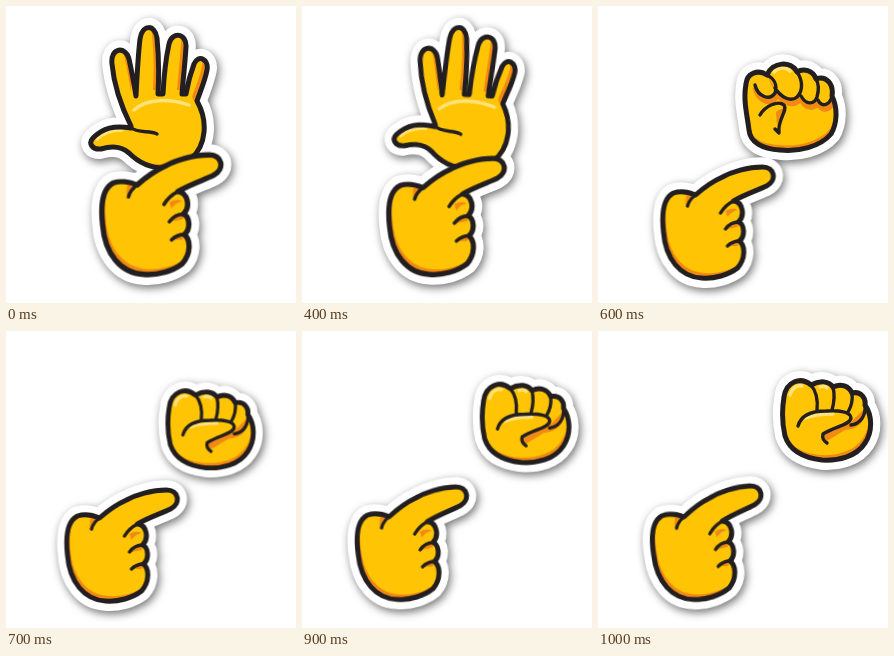
Animation of 290x297 px, one loop 1300 ms. Source, as an HTML page:

```html
<!DOCTYPE html>
<html lang="en">
<head>
<meta charset="utf-8">
<title>Pointing hand and fist</title>
<style>
  html, body { margin: 0; width: 100%; height: 100%; overflow: hidden; background: #fff; }
  svg { display: block; width: 100%; height: 100%; }

  .sticker { fill: #fff; stroke: #fff; stroke-width: 19.5; stroke-linejoin: round; filter: drop-shadow(2px 3px 4px rgba(0, 0, 0, .55)); }
  .shade { fill: #f18a13; }
  .skin { fill: #ffc505; }
  .ink { fill: none; stroke: #231f20; stroke-width: 5; stroke-linejoin: round; stroke-linecap: round; }
  .fine { stroke-width: 3.4; }
  .glow { fill: none; stroke: #ffe27c; stroke-width: 3.4; stroke-linecap: round; }
  .fold { fill: none; stroke: #f18a13; stroke-width: 6; stroke-linecap: round; }

  .open, .half, .fist, .point { animation: 1300ms step-end infinite; }
  .open { animation-name: open; transform-origin: 155px 125px; }
  .half { animation-name: half; }
  .fist { animation-name: fist; transform-origin: 229px 89px; }
  .point { animation-name: point; transform-origin: 56px 270px; }

  @keyframes open {
    0% { visibility: visible; transform: none; }
    30.76% { visibility: visible; transform: translate(8px, .5px) rotate(3.5deg); }
    38.46% { visibility: visible; transform: translate(17px, -4.6px) rotate(8.5deg) scale(.95); }
    46.15%, 100% { visibility: hidden; transform: none; }
  }
  @keyframes half {
    0% { visibility: hidden; }
    46.15% { visibility: visible; }
    53.84%, 100% { visibility: hidden; }
  }
  @keyframes fist {
    0% { visibility: hidden; transform: none; }
    53.84% { visibility: visible; transform: translate(-24px, 9px) scale(.97); }
    61.53% { visibility: visible; transform: translate(-13px, 6.5px) scale(.975); }
    69.23% { visibility: visible; transform: translate(-5px, 3px) scale(.985); }
    76.92%, 100% { visibility: visible; transform: none; }
  }
  @keyframes point {
    0% { transform: translate(39.5px, .5px) scale(1.077); }
    30.76% { transform: translate(30.5px, .5px) scale(1.045); }
    38.46% { transform: translate(18.5px, 1px) scale(1.01); }
    46.15% { transform: translate(8.5px, 4px); }
    53.84% { transform: translate(4.5px, 2px); }
    61.53% { transform: none; }
    69.23% { transform: translate(.5px, 1.5px) rotate(-1.5deg); }
    76.92%, 100% { transform: translate(.8px, 2.2px) rotate(-2.5deg); }
  }
</style>
</head>
<body>
<svg viewBox="0 0 290 297">
  <defs>
    <path id="openShape" d="M125 120 C117 104 108 80 106 58 C104 41 120 40 123 53 C126 66 128 78 130 90 C131 70 132 50 134 33 C136 18 149 18 151 32 C153 52 153 70 152 88 L157 88 C158 68 160 52 163 38 C166 25 181 27 180 41 C179 58 177 74 176 88 L180 88 C182 76 185 66 188 58 C192 48 203 53 201 64 C199 75 194 86 191 95 C196 104 199 116 198 126 C196 149 178 163 158 162 C142 162 131 155 123 147 C115 140 105 140 95 143 C86 144 82 137 87 132 C97 122 108 119 125 122Z"/>
    <path id="halfShape" d="M148 78 C149 67 160 63 169 69 C174 56 193 54 199 66 C205 62 215 64 218 73 C228 69 236 78 234 90 C240 102 239 118 233 128 C222 141 200 146 182 144 C164 143 152 136 151 124 C149 108 145 94 148 78Z"/>
    <path id="fistShape" d="M186 66 C188 51 202 45 213 54 C222 49 231 50 235 56 C243 52 251 55 254 62 C263 60 268 67 267 74 C274 84 275 100 267 112 C258 126 240 130 224 129 C206 127 192 120 187 105 C184 92 184 78 186 66Z"/>
    <path id="pointShape" d="M67 183 C73 181 82 182 89 185 C98 177 107 171 116 167 C125 162 141 157 156 157 C168 157 171 170 160 176 C152 180 139 184 127 191 C136 192 139 205 132 212 C138 214 139 226 133 231 C139 236 139 249 131 258 C122 265 108 269 95 268 C74 267 59 249 57 222 C55 204 57 188 67 183Z"/>
    <path id="halfFolds" d="M157 79 C160 91 172 95 177 87 C180 78 175 72 169 69 M177 82 C182 90 192 97 199 91 C206 84 204 73 199 66 M203 90 C208 99 216 99 219 91 C221 84 221 78 218 73 M220 94 C224 102 232 99 234 90"/>
    <clipPath id="openClip"><use href="#openShape"/></clipPath>
    <clipPath id="halfClip"><use href="#halfShape"/></clipPath>
    <clipPath id="fistClip"><use href="#fistShape"/></clipPath>
    <clipPath id="pointClip"><use href="#pointShape"/></clipPath>
  </defs>

  <g class="sticker">
    <use class="open" href="#openShape"/>
    <use class="half" href="#halfShape"/>
    <use class="fist" href="#fistShape"/>
    <use class="point" href="#pointShape"/>
  </g>

  <g class="open">
    <use class="shade" href="#openShape"/>
    <g clip-path="url(#openClip)">
      <use class="skin" href="#openShape" x="-5" y="-4"/>
      <path class="skin" d="M80 115 L120 95 H205 V140 L180 154 L118 142 L80 145Z"/>
      <path class="glow" d="M128 104 C140 93 162 92 183 99 M91 133 C98 126 107 124 116 124"/>
    </g>
    <use class="ink" href="#openShape"/>
    <path class="ink fine" d="M124 121 C132 128 143 124 151 128"/>
  </g>

  <g class="half">
    <use class="shade" href="#halfShape"/>
    <g clip-path="url(#halfClip)">
      <use class="skin" href="#halfShape" x="-1" y="-5"/>
      <use class="fold" href="#halfFolds" x="1" y="4"/>
      <path class="skin" d="M148 70 L169 69 L177 87 Q168 95 157 82Z M169 69 Q188 50 199 66 Q208 87 195 94 Q182 91 177 82Z M199 66 L218 73 Q222 96 211 97 L203 90Z M218 73 Q237 72 234 90 Q228 103 220 94Z"/>
      <path class="glow" d="M176 66 C181 61 188 61 192 65"/>
    </g>
    <use class="ink" href="#halfShape"/>
    <use class="ink fine" href="#halfFolds"/>
    <path class="shade" d="M178 106 Q184 101 186 104 L179 119Z"/>
    <path class="ink fine" d="M162 109 C167 100 180 94 186 99 C190 105 179 114 181 127 L177 123"/>
  </g>

  <g class="fist">
    <use class="shade" href="#fistShape"/>
    <g clip-path="url(#fistClip)">
      <use class="skin" href="#fistShape" x="-2" y="-5"/>
      <path class="shade" d="M225 104 C235 97 249 95 254 90 L268 76 C268 93 258 98 247 99 L229 110Z"/>
      <path class="glow" d="M192 64 C194 57 199 54 204 55 M222 56 Q226 54 229 57 M208 87 C216 83 227 83 235 83"/>
    </g>
    <use class="ink" href="#fistShape"/>
    <path class="ink fine" d="M213 54 C218 60 220 70 219 79 M235 56 C237 64 236 72 234 79 M254 62 C255 70 253 76 250 81 M200 95 C203 84 214 80 228 80 C241 79 253 81 253 87 C252 94 238 95 225 103 C224 107 226 110 229 112 M267 74 C268 85 262 93 253 94"/>
  </g>

  <g class="point">
    <use class="shade" href="#pointShape"/>
    <g clip-path="url(#pointClip)">
      <use class="skin" href="#pointShape" x="3" y="-5"/>
      <path class="skin" d="M84 196 L92 181 L140 154 H172 V178 L126 193 L116 204Z"/>
      <path class="shade" d="M79 195 Q82 187 89 185 L80 182Z M119 201 Q126 197 131 200 Q124 202 121 207Z M121 219 Q127 213 134 212 L131 217Z M122 236 Q128 231 134 231 L131 236Z"/>
    </g>
    <use class="ink" href="#pointShape"/>
    <path class="ink fine" d="M89 185 C85 188 82 192 81 196 M127 191 C121 194 117 198 114 203 M132 212 C127 212 122 215 119 219 M133 231 C129 231 124 233 121 236"/>
  </g>
</svg>
</body>
</html>
```
